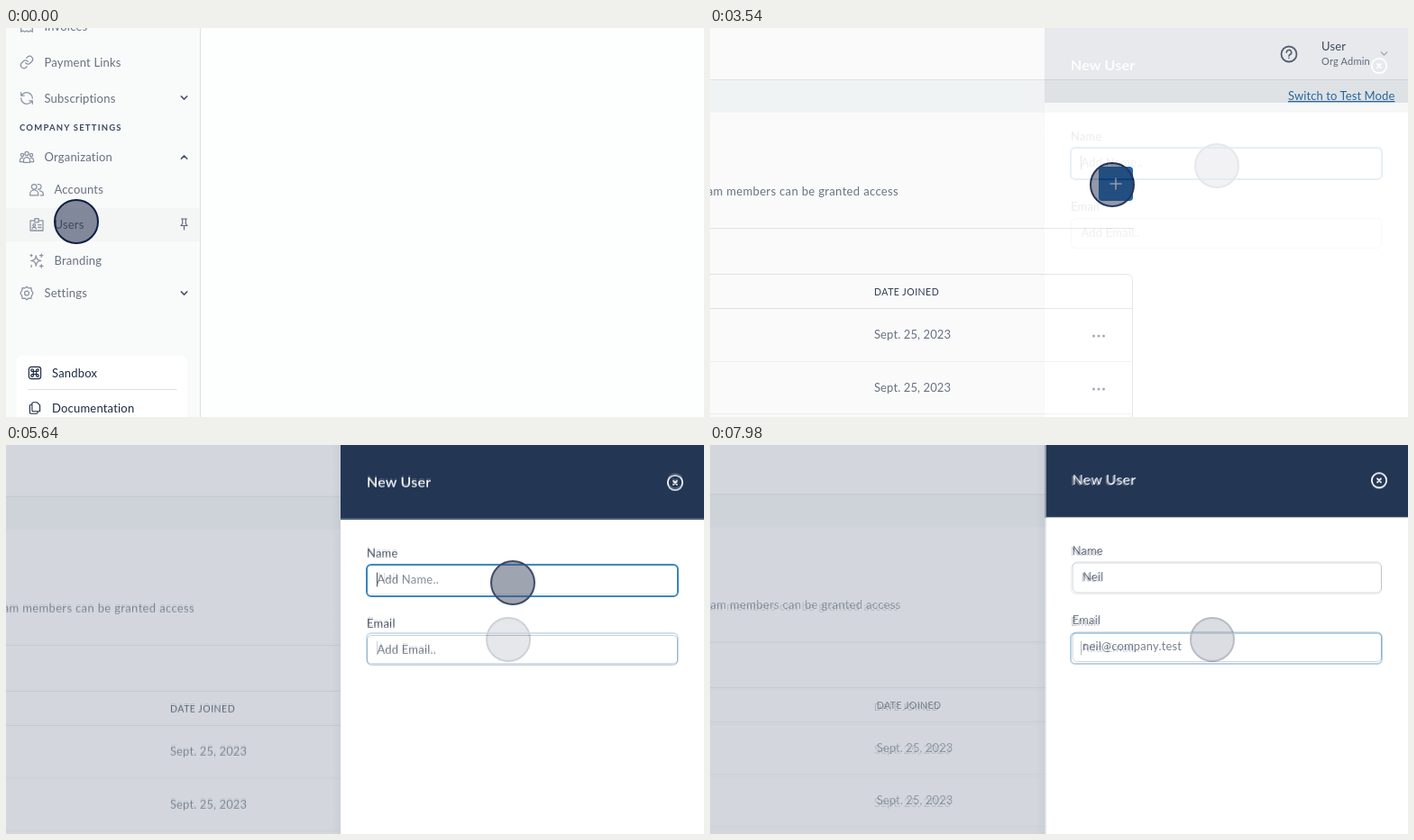
An HTML page that plays this animation: 774 by 432 pixels, repeating every 8 s.

```html
<!DOCTYPE html>
<html lang="en">
<head>
<meta charset="utf-8">
<title>Adding a user</title>
<style>
  html, body { margin: 0; width: 100%; height: 100%; overflow: hidden; background: #fff; }
  svg { display: block; }
  text { font: 13px Lato, "Open Sans", sans-serif; letter-spacing: .2px; fill: #677180; }
  .dark { fill: #1d2a44; }
  .label { fill: #414d61; }
  .small { font-size: 11px; }
  .caps { font-size: 10.5px; letter-spacing: .5px; fill: #2f3a4e; }
  .section { font-size: 9.5px; font-weight: 700; letter-spacing: 1.2px; fill: #3a4963; }
  .title { font-size: 16px; font-weight: 600; fill: #fff; }
  .date { letter-spacing: .1px; }
  .link { letter-spacing: .1px; fill: #2a6ba3; text-decoration: underline; }
  .note { letter-spacing: .35px; text-anchor: end; }
  .icon { fill: none; stroke-linecap: round; stroke-linejoin: round; }
</style>
</head>
<body>
<svg id="stage" width="774" height="432" viewBox="0 0 774 432"></svg>
<script>
const text = (x, y, s, cls = '') => `<text x="${x}" y="${y}" class="${cls}">${s}</text>`;
const rect = (x, y, w, h, fill, more = '') =>
  `<rect x="${x}" y="${y}" width="${w}" height="${h}" fill="${fill}" ${more}/>`;
const path = (d, color, width = 1) =>
  `<path class="icon" d="${d}" stroke="${color}" stroke-width="${width}"/>`;
const rule = (x1, x2, y, color = '#e3e5e8') => path(`M${x1} ${y}H${x2}`, color);
const ring = (x, y, r, color, width, fill = 'none') =>
  `<circle cx="${x}" cy="${y}" r="${r}" fill="${fill}" stroke="${color}" stroke-width="${width}"/>`;
const pointer = (x, y) => ring(x, y, 24, '#0f1e43', 2, 'rgba(16,28,62,.5)');
const chevron = (x, y, dir, color = '#4a566b', width = 1.5) =>
  path(`M${x - 3.2} ${y - 1.6 * dir}l3.2 ${3.2 * dir}l3.2 ${-3.2 * dir}`, color, width);

// Icons are drawn on a 24 unit grid and centred on x, y.
const icon = (name, x, y, color = '#8a93a3', scale = .7) =>
  `<g transform="translate(${x} ${y}) scale(${scale}) translate(-12 -12)">${path(icons[name], color, 1.8)}</g>`;
const icons = {
  receipt: 'M3 3V21l3-2 3 2 3-2 3 2 3-2 3 2V3',
  link: 'M10 13a5 5 0 0 0 7.5.5l3-3a5 5 0 0 0-7-7l-1.8 1.7M14 11a5 5 0 0 0-7.5-.5l-3 3a5 5 0 0 0 7 7l1.8-1.7',
  cycle: 'M21 12a9 9 0 0 0-9-9 10 10 0 0 0-7 2.8L3 8M3 3v5h5M3 12a9 9 0 0 0 9 9 10 10 0 0 0 7-2.8L21 16M16 16h5v5',
  group: 'M9 7a3 3 0 1 1 6 0a3 3 0 1 1-6 0M7 21v-3a5 5 0 0 1 10 0v3zM2.5 9a2.3 2.3 0 1 1 4.6 0a2.3 2.3 0 1 1-4.6 0M16.9 9a2.3 2.3 0 1 1 4.6 0a2.3 2.3 0 1 1-4.6 0M6 14c-3-1-5 1-5 6h6M18 14c3-1 5 1 5 6h-6',
  people: 'M4 7.5a4 4 0 1 1 8 0a4 4 0 1 1-8 0M14 3.7a4 4 0 1 1 0 7.6M1.5 21v-2a6.5 6.5 0 0 1 13 0v2zM17 14a6 6 0 0 1 5.5 6v1H18',
  badge: 'M9 6H2v16h20V6h-7M9 3h6v6H9zM6 13.5a2 2 0 1 1 4 0a2 2 0 1 1-4 0M5 19c0-3 6-3 6 0M14.5 13H19M14.5 17H19',
  sparkle: 'M11 4c1 6 2 7 8 8c-6 1-7 2-8 8c-1-6-2-7-8-8c6-1 7-2 8-8zM19.5 1v5M17 3.5h5M19.5 18v5M17 20.5h5M3.5 2v3M2 3.5h3M3.5 19v3',
  gear: 'M12 1.5l3 2.6 4-.5.5 4 2.6 4.4-2.6 4.4-.5 4-4-.5L12 22.5l-3-2.6-4 .5-.5-4L1.9 12l2.6-4.4.5-4 4 .5zM8.5 12a3.5 3.5 0 1 1 7 0a3.5 3.5 0 1 1-7 0',
  pin: 'M7 2h10M9 2v9l-3 3.5h12L15 11V2M12 14.5V22',
  command: 'M6 2h12a4 4 0 0 1 4 4v12a4 4 0 0 1-4 4H6a4 4 0 0 1-4-4V6a4 4 0 0 1 4-4zM9.5 9.5h5v5h-5zM9.5 9.5H8a2 2 0 1 1 1.5-2zM14.5 9.5V8a2 2 0 1 1 2 1.5zM14.5 14.5h2a2 2 0 1 1-2 2zM9.5 14.5v2a2 2 0 1 1-2-2z',
  copy: 'M9 2h7l5 5v11H9a2 2 0 0 1-2-2V4a2 2 0 0 1 2-2zM7 6H5a2 2 0 0 0-2 2v12a2 2 0 0 0 2 2h10a2 2 0 0 0 2-2v-2'
};

const item = (name, x, y, label) => icon(name, x, y) + text(x + 19.5, y + 4.5, label);

function sidebar() {
  return rect(0, 0, 774, 432, '#fdfefe') + rect(0, 0, 215, 432, '#f9fafa') +
    path('M215.5 0V432', '#dfe2e5') + rect(0, 200, 215, 37, '#f4f5f5') +
    item('receipt', 23, -2, 'Invoices') + item('link', 23, 38, 'Payment Links') +
    item('cycle', 23, 78, 'Subscriptions') + chevron(197.5, 77.5, 1) +
    text(15, 113.5, 'COMPANY SETTINGS', 'section') +
    item('group', 23, 143, 'Organization') + chevron(197.5, 143.5, -1) +
    item('people', 34, 179.5, 'Accounts') + item('badge', 34, 218, 'Users') +
    icon('pin', 197.5, 218, '#5a6578', .6) +
    item('sparkle', 34, 258.5, 'Branding') +
    item('gear', 23, 294.5, 'Settings') + chevron(197.5, 294.5, 1) +
    rect(12, 364, 189, 90, '#fff', 'rx="6"') +
    icon('command', 32, 383, '#1d2a44', .66) + text(51, 387.5, 'Sandbox', 'dark') +
    rule(25, 189, 401.5, '#dcdfe4') +
    icon('copy', 32, 422, '#1d2a44', .62) + text(51, 426.5, 'Documentation', 'dark') +
    pointer(78, 215);
}

function page() {
  const row = y => text(182, y + 4, 'Sept. 25, 2023', 'date') +
    [425.5, 431, 436.5].map(x => `<circle cx="${x}" cy="${y + 1}" r="1.5" fill="#9aa1ad"/>`).join('');
  return rect(-20, -20, 820, 500, '#fff') + rect(-20, 58, 820, 36, '#f5f7f7') + rule(-20, 800, 57.5) +
    ring(642, 29, 8.5, '#5a6577', 1.8) +
    path('M639.3 27.2a2.7 2.7 0 1 1 4 2.3q-1.3.8-1.3 1.7M642 33.4v.1', '#5a6577', 1.6) +
    text(678, 25, 'User', 'label') + text(678, 41, 'Org Admin', 'small') +
    chevron(747.5, 28.5, 1, '#a9afba', 1.3) +
    text(641, 80, 'Switch to Test Mode', 'link') +
    text(209, 186, 'team members can be granted access', 'note') + rule(-20, 469, 222.5) +
    rect(-30.5, 273.5, 499, 220, '#fff', 'rx="6" stroke="#e1e4e7"') +
    text(182, 297, 'DATE JOINED', 'caps') +
    rule(-20, 468, 311.5) + rule(-20, 468, 370.5, '#f0f1f3') + rule(-20, 468, 428.5, '#f0f1f3') +
    row(341) + row(400) +
    rect(431, 154, 38, 38, '#0058a8', 'rx="4"') + path('M444 173h12M450 167v12', '#fff', 1.6);
}

function field(y, h, label, hint, value, focus) {
  const box = focus
    ? rect(400, y - .5, 345, h + 1, '#fff', 'rx="5" stroke="#0d6cb5" stroke-width="2"') +
      path(`M411.5 ${y + 8.5}v15`, '#1d2430')
    : rect(400.5, y, 344, h, '#fff', 'rx="5" stroke="#c0c4cb"');
  return text(400, y - 8.5, label, 'label') + box +
    text(411.5, y + 20.5, value || hint, value ? 'label' : '');
}

function form(name, email, focus) {
  return page() + rect(-20, -20, 391, 500, 'rgba(145,155,170,.4)') +
    rect(361, -20, 10, 500, 'url(#shade)') +
    rect(371, -20, 430, 500, '#fff') + rect(371, -20, 430, 103, '#233654') +
    text(400, 47, 'New User', 'title') +
    ring(742, 42, 8.2, '#fff', 1.8) + path('M740 40l4 4M744 40l-4 4', '#fff', 1.8) +
    field(133.5, 34, 'Name', 'Add Name..', name, focus === 'name') +
    field(211.5, 33, 'Email', 'Add Email..', email, focus === 'email');
}

const scenes = [
  sidebar(),
  page() + pointer(446, 174),
  form('', '', 'name') + pointer(562, 153),
  `<g transform="translate(0 -2)">${form('Neil', '', 'email')}</g>` + pointer(557, 216),
  `<g transform="translate(3.7 -2.7) scale(.995)">${form('Neil', 'neil@company.test', '')}</g>`
];

const stage = document.getElementById('stage');
stage.innerHTML = `<defs><linearGradient id="shade">
    <stop offset="0" stop-color="#4a5268" stop-opacity="0"/>
    <stop offset="1" stop-color="#4a5268" stop-opacity=".06"/>
  </linearGradient></defs>` + scenes.map(s => `<g class="scene">${s}</g>`).join('');
const layers = [...stage.querySelectorAll('.scene')];

// Each scene dissolves over the previous one in ten steps.
const LOOP = 8000, HOLD = 1500, CYCLE = 2040, STEP = 60;
function draw() {
  const t = performance.now() % LOOP;
  layers.forEach((layer, i) => {
    const start = i ? HOLD + (i - 1) * CYCLE : -LOOP;
    const step = Math.floor((t - start) / STEP) + 1;
    layer.setAttribute('opacity', Math.max(0, Math.min(1, step / 10)));
  });
  requestAnimationFrame(draw);
}
draw();
</script>
</body>
</html>
```
